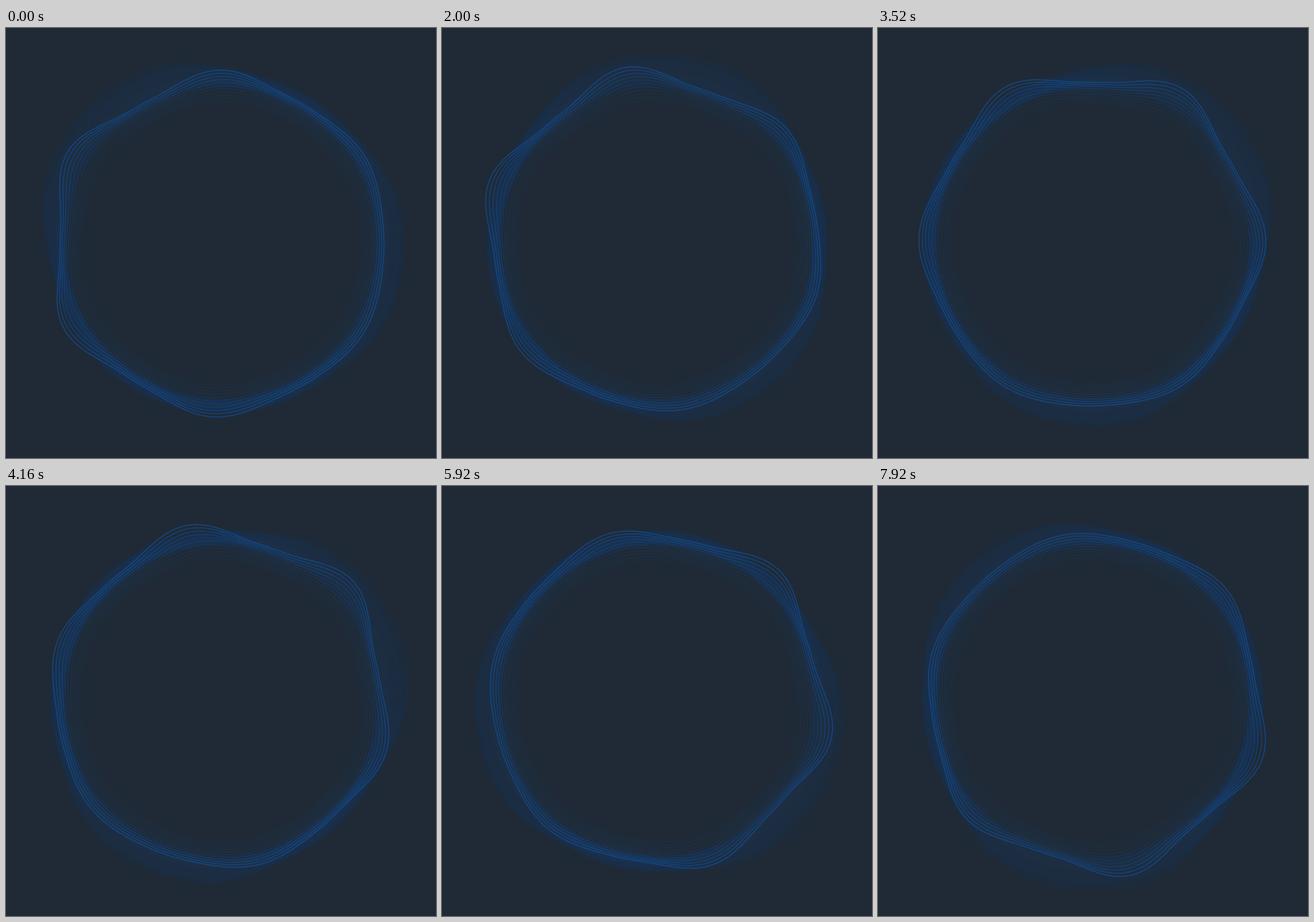
An HTML page with a canvas that plays this animation: 600 by 600 pixels, repeating every 8000 ms.

```html
<!DOCTYPE html>
<html lang="en">
<head>
<meta charset="utf-8">
<title>Wavering ring</title>
<style>
  html, body { margin: 0; width: 100%; height: 100%; overflow: hidden; background: #1f2a36; }
  canvas { display: block; }
</style>
</head>
<body>
<canvas width="600" height="600"></canvas>
<script>
const ctx = document.querySelector('canvas').getContext('2d');
const LOOP = 8000, STEP = 80, BASE = 226, TRAILS = 11, HAZE = 20;

const rad = deg => deg * Math.PI / 180;
const cos = deg => Math.cos(rad(deg));

// The whole ring turns clockwise, slower at first; t in seconds
const turn = t => 31 + 28.7 * t - 12 * Math.sin(Math.PI * t / 7.92);

// Six narrow crests, tallest on one side of the ring
function edge(deg) {
  const crest = ((1 + cos(6 * deg)) / 2) ** 1.4;
  return BASE + 3 * cos(deg - 30) + crest * (16 + 10 * cos(deg - 160));
}

function bump(deg, centre, width) {
  const d = ((deg - centre + 180) % 360 + 360) % 360 - 180;
  return Math.exp(-((d / width) ** 4));
}

// Reach of the outer glow, one wide and one weaker lobe
const glow = deg => Math.max(bump(deg, 195, 42), 0.7 * bump(deg, 335, 36));

function ring(radius, width, color) {
  ctx.beginPath();
  for (let deg = 0; deg < 360; deg += 2) {
    const r = radius(deg);
    ctx.lineTo(300 + r * cos(deg), 300 + r * Math.sin(rad(deg)));
  }
  ctx.closePath();
  ctx.lineWidth = width;
  ctx.strokeStyle = color;
  ctx.stroke();
}

function draw(t) {
  ctx.fillStyle = '#1f2a36';
  ctx.fillRect(0, 0, 600, 600);
  const phase = turn(t);

  for (let k = 0; k < HAZE; k++) {
    const f = k / (HAZE - 1);
    ring(deg => 219 + f * (18 + 25 * glow(deg - phase)), 5,
      `rgba(16,68,130,${0.085 - 0.035 * f})`);
  }

  // Trails shrink, flatten and fade towards the inside
  for (let k = TRAILS - 1; k >= 0; k--) {
    const flat = 1 - 0.08 * k;
    ring(deg => BASE + (edge(deg - phase - 0.6 * k) - BASE) * flat - 3.1 * k,
      k < 4 ? 1.5 : 1.1, `rgba(18,84,162,${0.62 * 0.83 ** k})`);
  }
}

function frame(now) {
  draw(Math.floor(now % LOOP / STEP) * STEP / 1000);
  requestAnimationFrame(frame);
}
draw(0);
requestAnimationFrame(frame);
</script>
</body>
</html>
```
